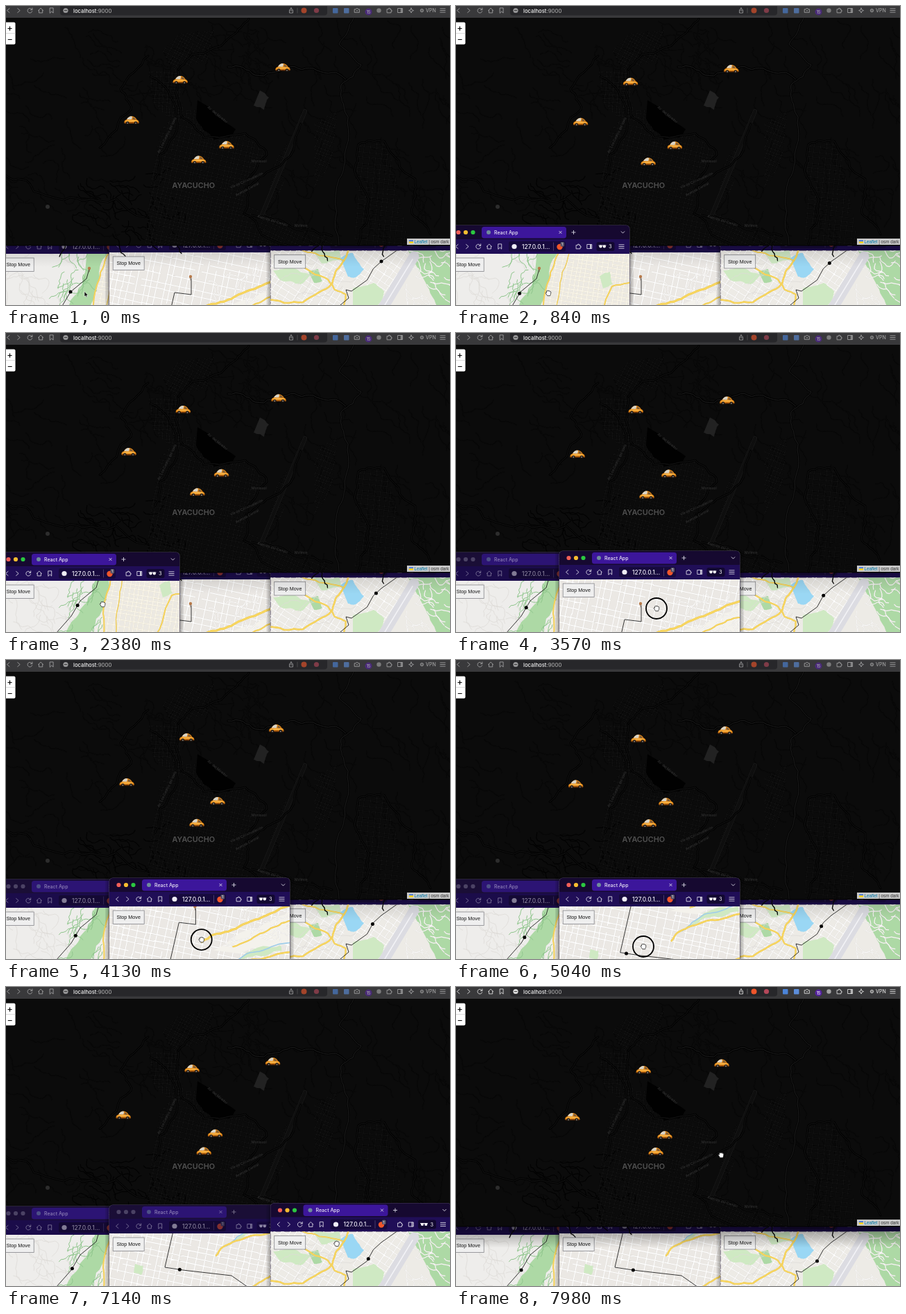
These frames come from a looping animation (640x432 px, 8000 ms). An HTML page:

```html
<!DOCTYPE html>
<html lang="en">
<head>
<meta charset="utf-8">
<title>Live map</title>
<style>
html, body { margin: 0; width: 100%; height: 100%; overflow: hidden; background: #0b0b0b; }
svg { display: block; width: 100%; height: 100%; }
text { font-family: Inter, Roboto, sans-serif; }
.arial { font-family: "Liberation Sans", Arial, sans-serif; }
.ln { fill: none; stroke-linejoin: round; stroke-linecap: round; }
.frame { fill: #1a0e36; }
.tools { fill: #1b0c4a; }
.tab { fill: #2c1474; }
.pill { fill: #140934; }
.light { fill: #4b4264; }
.icons { opacity: .5; }
.on .frame { fill: #160930; }
.on .tools { fill: #200e57; }
.on .tab { fill: #3c169b; }
.on .pill { fill: #170a3e; }
.on .icons { opacity: 1; }
.on .l0 { fill: #f25f57; }
.on .l1 { fill: #f5bd30; }
.on .l2 { fill: #2bc840; }
#main .icons { opacity: .62; }
#main.on .icons { opacity: 1; }
#main .shade { opacity: .35; }
#main.on .shade { opacity: 1; }
</style>
</head>
<body>
<svg id="stage" viewBox="0 0 640 432" preserveAspectRatio="none"></svg>
<script>
const LOOP = 8000;
const stage = document.getElementById('stage');
let seed = 7, clips = 0;

function rnd() {
  seed = (seed + 0x6D2B79F5) | 0;
  let n = Math.imul(seed ^ (seed >>> 15), 1 | seed);
  n = (n + Math.imul(n ^ (n >>> 7), 61 | n)) ^ n;
  return ((n ^ (n >>> 14)) >>> 0) / 4294967296;
}
const spread = size => (rnd() - .5) * size;

// ---- drawing helpers ----
const points = s => s.split(' ').map(p => p.split(',').map(Number));
const path = (d, color, w, extra = '') =>
  `<path class="ln" d="${d}" stroke="${color}" stroke-width="${w}" ${extra}/>`;
const line = (pts, color, w) => path('M' + pts, color, w);
const rect = (x, y, w, h, fill, r = 0) =>
  `<rect x="${x}" y="${y}" width="${w}" height="${h}" rx="${r}" fill="${fill}"/>`;
const circle = (x, y, r, fill, extra = '') => `<circle cx="${x}" cy="${y}" r="${r}" fill="${fill}" ${extra}/>`;
const text = (x, y, size, fill, s, extra = '') =>
  `<text x="${x}" y="${y}" font-size="${size}" fill="${fill}" ${extra}>${s}</text>`;

// Natural course through a few points, by midpoint displacement.
function rough(pts, wobble = .16) {
  let p = points(pts);
  for (let n = 0; n < 3; n++) {
    p = p.flatMap((a, i) => {
      const b = p[i + 1];
      if (!b) return [a];
      const k = spread(wobble * 2), dx = b[0] - a[0], dy = b[1] - a[1];
      return [a, [(a[0] + b[0]) / 2 - dy * k, (a[1] + b[1]) / 2 + dx * k]];
    });
  }
  return 'M' + p.map(q => q.map(v => v.toFixed(1))).join('L');
}
const patch = (pts, fill) => `<path d="${rough(pts, .1)}Z" fill="${fill}"/>`;

// Cased stroke: a wide edge below a thin core.
const cased = (d, edge, core, w, rim = .8) => path(d, edge, w + rim) + path(d, core, w);
const avenue = (pts, w = 2) => cased(rough(pts, .07), '#e6c350', '#f8d65f', w, .5);
const major = (pts, w = .7) => cased(rough(pts), '#000', '#1f1f1f', w, 2);

// Street grid inside a polygon, turned by an angle.
function streets(pts, angle, step, draw) {
  const p = points(pts), xs = p.map(q => q[0]), ys = p.map(q => q[1]);
  const x0 = Math.min(...xs), x1 = Math.max(...xs), y0 = Math.min(...ys), y1 = Math.max(...ys);
  const r = Math.hypot(x1 - x0, y1 - y0) / 2;
  let d = '';
  for (const across of [false, true]) {
    for (let u = -r; u < r; u += step * (.7 + rnd() * .7)) {
      let v = -r;
      while (v < r) {
        const end = v + step * (2 + rnd() * 9), w = u + spread(2);
        d += across ? `M${v.toFixed(1)} ${u.toFixed(1)}L${end.toFixed(1)} ${w.toFixed(1)}`
                    : `M${u.toFixed(1)} ${v.toFixed(1)}L${w.toFixed(1)} ${end.toFixed(1)}`;
        v = end + (rnd() < .3 ? step : 0);
      }
    }
  }
  const id = 'clip' + clips++;
  return `<clipPath id="${id}"><polygon points="${pts}"/></clipPath><g clip-path="url(#${id})">` +
    `<g transform="translate(${(x0 + x1) / 2} ${(y0 + y1) / 2}) rotate(${angle})">${draw(d)}</g></g>`;
}

// Many winding lanes scattered over a box, keeping roughly to one heading.
function tracks(n, x, y, w, h, heading, len, draw) {
  let d = '';
  for (let i = 0; i < n; i++) {
    let px = x + rnd() * w, py = y + rnd() * h, a = heading + spread(1.2);
    d += `M${px.toFixed(1)} ${py.toFixed(1)}`;
    for (let j = 0; j < len; j++) {
      a += spread(1.7) + (heading - a) * .2;
      px += Math.cos(a) * 4;
      py += Math.sin(a) * 4;
      d += `L${px.toFixed(1)} ${py.toFixed(1)}`;
    }
  }
  return draw(d);
}

// ---- toolbar icons, centred on x, y ----
const glyphs = {
  back: 'M2 -3L-1.5 0L2 3',
  next: 'M-2 -3L1.5 0L-2 3',
  reload: 'M3.2 -1.2A3.4 3.4 0 1 0 3.3 1.2M3.5 -3.6V-1H1',
  home: 'M-3.5 0L0 -3.5L3.5 0M-2.6 -.6V3.4H2.6V-.6',
  mark: 'M-2.3 -3.6H2.3V3.6L0 1.4L-2.3 3.6Z',
  puzzle: 'M-3 -2H-.9V-3.3H.9V-2H2.5V-.2H3.6V1.4H2.5V3.3H-3Z',
  panel: 'M-3.3 -3H3.3V3H-3.3ZM1 -3V3M2 -3V3',
  menu: 'M-3.6 -2.6H3.6M-3.6 0H3.6M-3.6 2.6H3.6',
  share: 'M-1.4 -.8H-2.5V3.5H2.5V-.8H1.4M0 1V-3.8M-1.4 -2.4L0 -3.8L1.4 -2.4',
  camera: 'M-3.4 -1.8H-1.6L-.8 -3H.8L1.6 -1.8H3.4V2.8H-3.4ZM-1 .4H1',
  spark: 'M0 -3.5L1 -1L3.5 0L1 1L0 3.5L-1 1L-3.5 0L-1 -1Z',
  cross: 'M-1.7 -1.7L1.7 1.7M1.7 -1.7L-1.7 1.7',
  plus: 'M-2.6 0H2.6M0 -2.6V2.6',
  down: 'M-2.3 -1.2L0 1.2L2.3 -1.2'
};
const icon = (name, x, y, color = '#d9d6e4', w = .9) =>
  path(glyphs[name], color, w, `transform="translate(${x} ${y})"`);
// A row of evenly spaced icons.
const iconRow = (names, x, gap, y, color) =>
  names.split(' ').map((name, i) => icon(name, x + i * gap, y, color)).join('');

// ---- the dark city map ----
function darkMap() {
  const lane = d => cased(d, '#030303', '#1d1d1d', .55, 1);
  const trail = d => cased(d, '#040404', '#141414', .4, .9);
  const label = (x, y, a, s) =>
    text(0, 0, 5, '#393939', s, `transform="translate(${x} ${y}) rotate(${a})"`);
  return rect(0, 17, 640, 328, '#0b0b0b') +
    tracks(50, -20, 30, 200, 300, .5, 13, trail) +
    tracks(60, 190, 20, 190, 110, .8, 12, trail) +
    tracks(80, 385, 20, 250, 310, 1.2, 14, trail) +
    tracks(34, 90, 240, 150, 90, .6, 10, d => path(d, '#020202', 1.2)) +
    streets('205,95 248,92 256,152 285,148 275,165 232,160 212,140', 4, 5, lane) +
    streets('210,245 222,180 245,155 276,165 300,193 345,184 376,215 348,255 342,300 405,345 200,345', 13, 6, lane) +
    streets('225,65 250,40 300,35 290,80 240,92', 28, 5, lane) +
    streets('505,200 545,195 560,235 580,345 503,345', 6, 7, lane) +
    streets('385,230 405,195 400,260 375,300', 21, 6, lane) +
    streets('445,170 478,150 470,225 445,265', 21, 6, lane) +
    streets('340,285 375,300 470,330 470,345 375,345', 24, 6, lane) +
    patch('276,136 331,178 322,190 300,193 274,162', '#010101') +
    patch('366,122 379,132 372,150 357,144', '#222') +
    line('431,152 368,304', '#1a1a1a', 6) + line('431,152 368,304', '#0e0e0e', 4.6) +
    major('248,92 252,158 285,190 345,184 376,215 345,265 343,300 405,345') +
    major('215,250 222,215 245,155 208,102') +
    major('348,262 386,235 425,170') +
    major('343,300 400,312 470,332') +
    major('0,245 40,268 110,281 200,305') +
    major('508,345 512,260 508,200 545,195 590,250 585,300 612,330') +
    major('248,92 268,70 330,40 350,18') +
    major('205,72 165,120 180,150 135,205') +
    major('320,88 360,100 405,90 448,93 490,106', 1) +
    cased(rough('501,17 480,55 512,85 483,114 487,145 489,210 480,250 480,345', .1), '#050505', '#1f1f1f', .9, 2) +
    circle(60, 290, 3, '#2d2d2d') +
    label(221, 213, -64, 'Av. Los Cedros del Valle') + label(290, 147, 39, 'Av. del Mirador') +
    label(324, 264, -24, 'Vía de Circunvalación') + label(332, 275, -28, 'Avenida Central') +
    label(362, 305, 17, 'Avenida del Campo') + label(354, 226, 0, 'Montesol') + label(416, 319, 0, 'Molinos') +
    text(239.5, 262.5, 10.8, '#505050', 'AYACUCHO', 'font-weight="600"');
}

function mainWindow() {
  const grey = '#dcdcdc', bold = 'font-weight="500"';
  const bar = rect(0, 0, 640, 17, '#39393b') + rect(78, -4, 385, 17.5, '#27272a', 4) +
    '<g class="icons">' + iconRow('back next reload home mark', 3, 15.7, 6.5, grey) +
    icon('share', 411, 6.5, grey) + circle(86, 6.5, 3.6, grey) + path('M84.3 6.5H87.7', '#333', .9) +
    circle(429.5, 6.5, 4, '#f0562b') + circle(447.5, 6.5, 3.6, '#b4485a') + path('M420 3V10', '#777', .7) +
    rect(471, 3, 7.5, 7.5, '#4b84d8', 1) + rect(487, 3, 7.5, 7.5, '#5c8edb', 1) +
    icon('camera', 506, 6.5, grey) + circle(522.5, 8.5, 5, '#55239f') + text(519.7, 11, 5.5, '#fff', '15', bold) +
    circle(537.5, 6.5, 3.2, '#a4a4a4') + iconRow('puzzle panel spark', 552.5, 15.8, 6.5, grey) +
    circle(599.5, 6.5, 2.2, '#777', `stroke="${grey}" stroke-width=".8"`) + text(605, 9.2, 7, grey, 'VPN', bold) +
    icon('menu', 629.5, 6.5, grey) + '</g>' +
    text(97, 9.5, 7.7, '#f2f2f2', 'localhost<tspan fill="#a6a6a6">:9000</tspan>', bold);
  const zoom = rect(-4, 23.5, 17.5, 32, '#fff', 2) + path('M0 39.5H13', '#ccc', .7) +
    icon('plus', 5.5, 32.5, '#000', 1.2) + path('M3.2 48.5H8.2', '#000', 1.2);
  const credit = rect(578, 336, 62, 9, '#c9c9c9') +
    rect(581, 338.2, 6, 2.2, '#4c7be1') + rect(581, 340.4, 6, 2.2, '#ffd500') +
    text(588.5, 342.9, 6.3, '#0078a8', 'Leaflet <tspan fill="#333">| osm dark</tspan>', 'class="arial"');
  return `<g id="main"><rect class="shade" y="345" width="640" height="32" fill="url(#shade)"/>` +
    rect(-5, 342, 650, 4.5, '#050505', 2) + darkMap() + `<g id="cars"></g>${bar}${zoom}${credit}</g>`;
}

// ---- the three street maps ----
const white = w => d => cased(d, '#dcd9d4', '#fff', w, .5);
const faint = d => path(d, '#dddbd7', .8);
const scrub = d => path(d, '#8fc68c', 1);
const park = '#add9a5', meadow = '#cfe9c3';
const route = pts => line(pts, '#222', .9);
const pin = (x, y) => circle(x, y - 1, 2.2, '#b87b4b') + path(`M${x} ${y + 1}v3`, '#6d4a35', .8);

const mapA = () =>
  rect(-30, 330, 300, 170, '#eeedeb') +
  tracks(36, -40, 340, 140, 130, .8, 12, faint) +
  rect(128, 330, 150, 170, '#ece9e2') +
  streets('138,340 270,340 270,480 105,480 124,428', 9, 7, d => cased(d, '#e4ddc9', '#fdfaf0', .9, .5)) +
  patch('118,340 150,350 134,385 124,428 98,475 66,475 84,440 104,412 114,385', park) +
  tracks(26, 80, 350, 45, 100, 2, 7, scrub) +
  avenue('151,340 136,385 128,415 120,480', 1.4) + avenue('166,340 150,400 142,480', .7) +
  avenue('270,390 225,405 190,480', 1.4) + patch('207,390 222,384 226,402 212,408', meadow) +
  route('120,380 116,394 93,413 80,435 58,460') + pin(120, 380);

const mapB = () =>
  rect(120, 210, 360, 290, '#ebe8e4') +
  streets('130,220 470,220 470,480 130,480', 12, 10, white(1.3)) +
  patch('301,345 345,318 420,280 470,272 470,300 340,350', '#f4f2ec') +
  tracks(26, 300, 280, 120, 60, -.5, 9, white(.9)) +
  patch('325,370 352,355 400,346 398,338 350,348', meadow) +
  path(rough('318,374 350,350 385,340 470,322', .06), '#9fcdea', 1.6) +
  avenue('285,333 301,323 344,308 390,290 470,258', 2.6) +
  avenue('330,340 369,321 400,306 440,300', 1.6) +
  avenue('303,388 312,376 335,366 370,358 470,336', 2) +
  avenue('340,445 362,429 384,416 470,395', 1.8) +
  patch('186,400 198,403 195,416 184,413', meadow) +
  route('276,285 276,308 252,305 229,405 255,409 325,417 352,436 390,470') + pin(275, 283);

const mapC = () =>
  rect(375, 345, 275, 95, '#edebe6') +
  streets('380,345 490,345 485,440 380,440', 32, 9, white(1.1)) +
  streets('500,345 585,345 545,440 500,440', 34, 9, white(1)) +
  patch('385,382 410,376 440,388 425,402 395,396', meadow) +
  patch('440,350 480,352 482,366 455,372', meadow) + patch('436,384 450,380 456,397 444,400', park) +
  patch('500,408 530,400 545,412 530,440 500,440', meadow) +
  patch('575,345 650,345 650,440 622,440 605,400', park) +
  tracks(26, 575, 350, 65, 75, .7, 8, white(.8)) + tracks(14, 385, 365, 100, 60, -.6, 10, faint) +
  line('541,440 588,362', '#dcdce2', 15) + line('546,432 586,366', '#f3f3f6', 1.5) +
  patch('482,364 500,357 516,380 504,392 493,391', '#9ad7f4') +
  avenue('375,424 428,428 470,401 476,382 487,368 494,345') +
  avenue('430,378 464,395 474,410 490,417 486,440', 1.7) + avenue('400,345 440,356 487,368', 1.3) +
  route('565,352 541,369 529.5,379.5 520.5,396 498,412 490,410 494,422 482,432');

function browser(id, x, y, map) {
  const bold = 'font-weight="500"';
  const lights = [0, 1, 2].map(i => `<circle class="light l${i}" cx="${13.5 + 10.5 * i}" cy="10" r="3.1"/>`).join('');
  const shadow = [6, 4, 2].map(s =>
    `<rect x="${-s}" y="${-s / 2}" width="${260 + 2 * s}" height="150" rx="8" opacity=".1"/>`).join('');
  return `<g id="${id}" transform="translate(${x} ${y})">${shadow}` +
    rect(-.5, -.5, 261, 150, '#4a4160', 5.5) +
    `<rect class="frame" width="260" height="150" rx="5"/>` +
    `<rect class="tools" y="20" width="260" height="21"/>` +
    `<rect class="tab" x="47" y="2" width="122" height="16.5" rx="3.5"/>${lights}` +
    `<rect class="pill" x="86" y="23" width="82" height="15" rx="3"/>` +
    `<g class="icons">${circle(57, 10, 3, '#6f8c9b')}` + text(65, 12.6, 7, '#eeeaf7', 'React App', bold) +
    icon('cross', 160.5, 10) + icon('plus', 179.5, 10) + icon('down', 250.5, 10) +
    iconRow('back next reload home mark', 11, 15.6, 30.5) + iconRow('puzzle panel', 186.5, 16, 30.5) +
    icon('menu', 248.5, 30.5) + circle(94, 30.5, 3.6, '#efedf5') +
    text(105, 33.5, 8.4, '#f3f0fa', '127.0.0.1...', bold) + path('M150.5 25V36', '#5d5080', .7) +
    circle(159.5, 31, 4.2, '#f0562b') + rect(160.5, 24, 5.6, 6.4, '#59546a', 1.5) + text(162, 29.2, 5, '#fff', '1') +
    rect(212.5, 24, 26, 13, '#120831', 3) + path('M216 29H226', '#fff', 1) +
    circle(218.5, 30.5, 2.1, '#fff') + circle(223.8, 30.5, 2.1, '#fff') + text(230, 33.4, 7.4, '#fff', '3') + '</g>' +
    `<g clip-path="url(#view)"><g transform="translate(${-x} ${-y})"><g id="pan${id}">${map}` +
    circle(0, 0, 2.5, '#000', `id="dot${id}"`) + '</g></g></g>' +
    `<rect x="5.2" y="47" width="45" height="19.5" fill="#efefef" stroke="#85858a" stroke-width=".8"/>` +
    text(27.7, 59, 7.2, '#111', 'Stop Move', 'class="arial" text-anchor="middle"') + '</g>';
}

const car = '<g id="car"><path d="M-10.6 4C-11 1 -9.5 -.6 -7.5 -1C-5 -4.6 -3 -6 0 -6C4 -6 6 -3.6 7.6 -1C10 -.2 11 1.8 10.6 4Z" fill="#df8618"/>' +
  '<path d="M-8 .2C-4 -.8 5 -.8 9 .6L8 1.6H-9Z" fill="#f9b548"/>' +
  '<path d="M-7 -1.2C-5 -4.6 -3 -6 0 -6L1 -5L0 -1.2Z" fill="#d9d4c6"/>' +
  '<path d="M1.8 -4.6C4 -4.4 5.4 -2.8 6 -1.2H1.6Z" fill="#7a5c3c"/>' +
  '<path d="M-10.6 3H10.7L10 4.6H-10Z" fill="#74390b"/>' +
  [-5.8, 6].map(x => circle(x, 3.8, 2.3, '#1c1612') + circle(x, 3.8, .9, '#9a948c')).join('') + '</g>';

const hand = '<path d="M-3.2 .8C-4.6 -.4 -3.7 -1.6 -2.4 -.7L-2.5 -2.6C-2.3 -3.7 -1.2 -3.7 -1 -2.8C-.8 -4.2 .7 -4.2 .8 -2.8C1.2 -3.8 2.4 -3.5 2.4 -2.3C3 -2.8 3.9 -2.3 3.8 -1.4C3.8 1 3.4 1.8 2.6 3.7H-1.3Z" fill="#fff" stroke="#222" stroke-width=".8"/>';

stage.innerHTML = `<defs><clipPath id="view"><rect y="41" width="260" height="100"/></clipPath>${car}` +
  '<linearGradient id="shade" x2="0" y2="1"><stop stop-opacity=".4"/><stop offset="1" stop-opacity="0"/></linearGradient></defs>' +
  '<rect width="640" height="432" fill="#150a30"/><g id="desk">' +
  browser('A', -10, 317, mapA()) + browser('B', 149, 315, mapB()) +
  browser('C', 381.5, 312.5, mapC()) + mainWindow() + '</g>' +
  '<g id="cursor"><circle id="ring" r="15" fill="none" stroke="#000" stroke-width="1.8"/>' +
  `<g id="hand">${hand}</g><path id="arrow" d="M-1 -3.5V4L.7 2.5L1.9 5L3.1 4.4L2 2H4.3Z" fill="#000" stroke="#fff" stroke-width=".6"/></g>`;

// ---- motion ----
const $ = id => document.getElementById(id);
const move = (el, [x, y]) => el.setAttribute('transform', `translate(${x.toFixed(2)} ${y.toFixed(2)})`);
const show = (el, on) => el.setAttribute('visibility', on ? 'visible' : 'hidden');
const mix = (a, b, k) => a.map((v, i) => v + (b[i] - v) * k);

// Constant speed along a polyline between two times.
function trip(pts, from = 0, to = LOOP) {
  const p = points(pts);
  const legs = p.slice(1).map((b, i) => Math.hypot(b[0] - p[i][0], b[1] - p[i][1]));
  const total = legs.reduce((a, b) => a + b);
  return t => {
    let left = total * Math.min(1, Math.max(0, (t - from) / (to - from))), i = 0;
    while (i < legs.length - 1 && left > legs[i]) left -= legs[i++];
    return mix(p[i], p[i + 1], left / legs[i]);
  };
}

const carTrips = [
  '399,89 392.5,95 383,110.5',
  '251.2,107 251.7,111 259.5,111 270.3,120',
  '181,165.3 167.8,188',
  '318,201.3 303,204.4 301,214.4',
  '277.8,222.4 274.7,235.8 288.2,238'
].map(s => trip(s));
const dots = {
  A: trip('93,413 80,435'),
  B: trip('234,384 229,405 255.5,409'),
  C: trip('541,369 529.5,379.5 520.5,396')
};
const pans = {
  A: trip('0,0 14,-26', 950, 1700),
  B: trip('-9,109 8,16 0,0', 3570, 5350)
};
const stops = [
  [0, 114, 416], [840, 133, 415], [1700, 145, 390], [2380, 139, 392], [3300, 289, 398], [3570, 289, 398],
  [5040, 270, 414], [5700, 275, 400], [6300, 496, 400], [6950, 498, 400], [7980, 382, 243]
];
function pointer(t) {
  const i = Math.max(1, stops.findIndex(s => s[0] > t));
  const [a, b] = [stops[i - 1], stops[i]];
  return t >= stops.at(-1)[0] ? stops.at(-1).slice(1) : mix(a, b, (t - a[0]) / (b[0] - a[0])).slice(1);
}
const presses = [[950, 1700], [3300, 5350]];
const arrows = [[0, 500], [5750, 6480]];
const within = (spans, t) => spans.some(([a, b]) => t >= a && t < b);

// start time, stacking from back to front, focused window
const stacks = [
  [0, 'A B C main', ''],
  [420, 'B C main A', 'A'],
  [2940, 'C main A B', 'B'],
  [6500, 'main A B C', 'C'],
  [7450, 'A B C main', 'main']
];

$('cars').innerHTML = carTrips.map(() => '<use href="#car"/>').join('');
const cars = [...$('cars').children];
let current = null;

function render(t) {
  const stack = stacks.filter(s => t >= s[0]).pop();
  if (stack !== current) {
    current = stack;
    for (const id of stack[1].split(' ')) {
      $('desk').appendChild($(id));
      $(id).setAttribute('class', id === stack[2] ? 'on' : '');
    }
  }
  cars.forEach((el, i) => move(el, carTrips[i](t)));
  for (const id in dots) move($('dot' + id), dots[id](t));
  for (const id in pans) move($('pan' + id), pans[id](t));
  const arrow = within(arrows, t);
  move($('cursor'), pointer(t));
  show($('ring'), within(presses, t));
  show($('hand'), !arrow);
  show($('arrow'), arrow);
}

const start = performance.now();
function tick() {
  render((performance.now() - start) % LOOP);
  requestAnimationFrame(tick);
}
tick();
</script>
</body>
</html>
```
